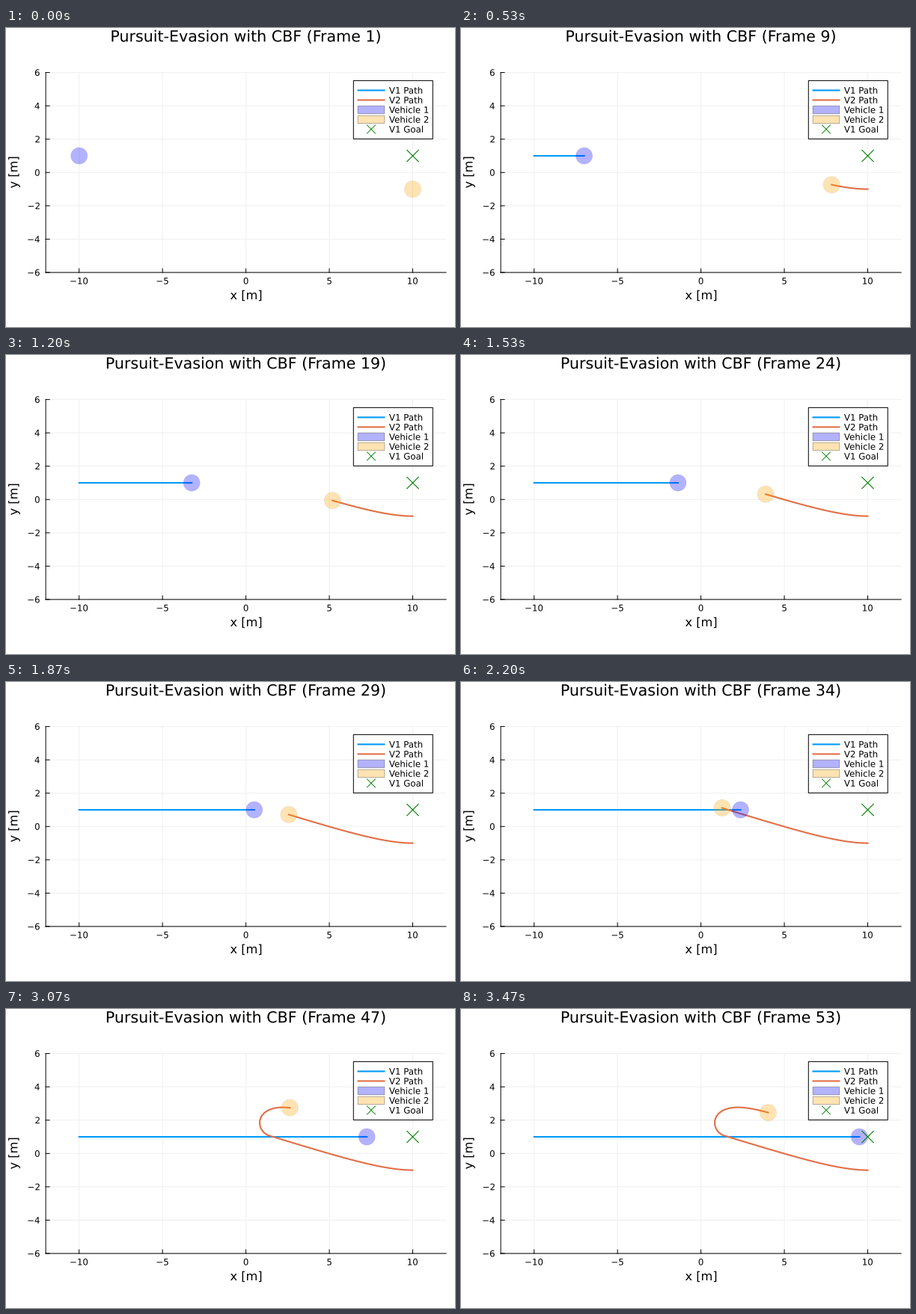
A matplotlib script for the animation above (3540 ms loop, 600 px wide and 400 px high).

```python
import numpy as np
import matplotlib.pyplot as plt
from matplotlib.animation import FuncAnimation
from matplotlib.patches import Circle, PathPatch, Rectangle
from matplotlib.textpath import TextPath
from matplotlib.transforms import Affine2D

W, H, DPI = 600, 400, 100
STEPS, TICK_MS, LOOP_MS = 53, 10, 3540
UNIT, X0, Y0 = 22.29, 320.6, 193.3  # pixels per metre, pixel of the origin
BLUE, RED, GREEN = "#009AFA", "#E26F46", "#008000"

plt.rcParams["font.family"] = "DejaVu Sans"
plt.rcParams["path.snap"] = False


def pt(px):
    return px * 72 / DPI


def px_x(x):
    return X0 + UNIT * x


def px_y(y):
    return Y0 - UNIT * y


fig = plt.figure(figsize=(W / DPI, H / DPI), dpi=DPI, facecolor="white")
ax = fig.add_axes([0, 0, 1, 1])
ax.set_xlim(0, W)
ax.set_ylim(H, 0)
ax.axis("off")


def line(xs, ys, color="black", width=1.0, z=1):
    return ax.plot(xs, ys, color=color, lw=pt(width), zorder=z,
                   solid_capstyle="projecting", snap=False)[0]


def outline(x, y, text, size, align=0.5, angle=0):
    """Text outline with its baseline through (x, y)."""
    path = TextPath((0, 0), text, size=size)
    box = path.get_extents()
    shift = box.x0 + align * box.width
    place = Affine2D().translate(-shift, 0).scale(1, -1)
    return path.transformed(place.rotate_deg(-angle).translate(x, y))


def label(*args, **kw):
    return ax.add_patch(PathPatch(outline(*args, **kw), fc="black", lw=0,
                                  zorder=8, snap=False))


def number(x, y, value, align=0.5):
    label(x, y, str(value).replace("-", "\u2212"), 11.8, align)


def cross(x, y, arm, width, z):
    for s in (-1, 1):
        line([x - arm, x + arm], [y - s * arm, y + s * arm], GREEN, width, z)


def box(x, y, w, h, face, edge, z):
    ax.add_patch(Rectangle((x, y), w, h, fc=face, ec=edge, lw=pt(1),
                           zorder=z, snap=False))


def disc(color, z):
    return ax.add_patch(Circle((0, 0), UNIT / 2, fc=(color, 0.3),
                               ec=("black", 0.06), lw=pt(0.8), zorder=z))


# Axes, grid and tick labels
left, right, top, bottom = px_x(-12), px_x(12), px_y(6), px_y(-6)
for v in range(-10, 11, 5):
    x = px_x(v)
    line([x, x], [top, bottom], "#f0f0f0")
    line([x, x], [bottom, bottom - 5], z=2)
    number(x, 342.6, v)
for v in range(-6, 7, 2):
    y = px_y(v)
    line([left, right], [y, y], "#f0f0f0")
    line([left, left + 5], [y, y], z=2)
    number(44.8, y + 4.4, v, align=1)
line([left, right], [bottom, bottom], z=2)
line([left, left], [top, bottom], z=2)
label(X0, 363, "x [m]", 16.2)
label(15.4, Y0, "y [m]", 16.2, angle=90)

# Legend
ROW = 13
LEG_X, LEG_Y = 464.3, 70.4
box(LEG_X, LEG_Y, 106, 6 * ROW, "white", "black", 6)
names = ["V1 Path", "V2 Path", "Vehicle 1", "Vehicle 2", "V1 Goal"]
rows = [LEG_Y + ROW * (i + 1) for i in range(len(names))]
for name, y in zip(names, rows):
    label(512, y + 4.3, name, 11.8, align=0)
for color, y in zip((BLUE, RED), rows):
    line([470.5, 505.5], [y, y], color, 2.1, 7)
for color, y in zip(("blue", "orange"), rows[2:]):
    box(470.2, y - 0.4 * ROW, 35.6, 0.8 * ROW, (color, 0.3), ("black", 0.3), 7)
cross(488, rows[-1], 5.5, 0.9, 7)

# Vehicle 1 drives straight on
step = np.arange(STEPS)
x1 = px_x(-10 + 0.375 * step)
y1 = np.full(STEPS, px_y(1))

# Vehicle 2 closes in, swerves at a steady rate, then settles on a new course
COURSE, SWERVE, RELEASE, TURNED = 162.8, 32.45, 38, 62
mid = step[:-1] + 0.5
approach = COURSE + (180 - COURSE) * np.exp(-mid / 7)
swerve = COURSE + (TURNED - COURSE) * (mid - SWERVE) / (RELEASE - SWERVE)
settle = -18 + (TURNED + 18) * np.exp(-(mid - RELEASE) / 4.2)
heading = np.radians(np.select([mid < SWERVE, mid < RELEASE],
                               [approach, swerve], settle))
speed = np.interp(mid, [32, 38.5], [0.273, 0.238])
x2 = px_x(10 + np.append(0, np.cumsum(speed * np.cos(heading))))
y2 = px_y(-1 + np.append(0, np.cumsum(speed * np.sin(heading))))

titles = [outline(X0, 18.2, f"Pursuit-Evasion with CBF (Frame {k + 1})", 20.6)
          for k in step]
title = ax.add_patch(PathPatch(titles[0], fc="black", lw=0, snap=False))
path1 = line([], [], BLUE, 2.1, 3)
path2 = line([], [], RED, 2.1, 3.1)
car1 = disc("blue", 4)
car2 = disc("orange", 4.1)
cross(px_x(10), px_y(1), 7.7, 1.1, 5)

# 15 steps per second, rounded to whole ticks
starts = np.rint(step * 1000 / 15 / TICK_MS)


def update(i):
    k = int(np.searchsorted(starts, i, "right")) - 1
    n = k + 1 if k else 0
    title.set_path(titles[k])
    path1.set_data(x1[:n], y1[:n])
    path2.set_data(x2[:n], y2[:n])
    car1.center = x1[k], y1[k]
    car2.center = x2[k], y2[k]
    return title, path1, path2, car1, car2


anim = FuncAnimation(fig, update, frames=LOOP_MS // TICK_MS, interval=TICK_MS,
                     repeat=True, repeat_delay=0, blit=False)
plt.show()
```
